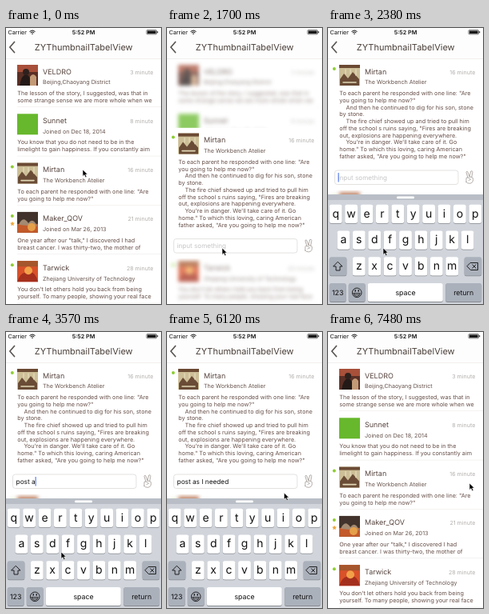
Write an HTML page that moves like this. It is 194 by 345 pixels and loops after 7820 ms.

```html
<!DOCTYPE html>
<html lang="en">
<head>
<meta charset="utf-8">
<title>Thumbnail list</title>
<style>
  html, body { margin: 0; width: 100%; height: 100%; overflow: hidden; background: #fff; }
  svg { display: block; }
  text { font-family: Inter, Roboto, "Liberation Sans", sans-serif; text-rendering: geometricPrecision; white-space: pre; }
  .name { font-size: 9px; fill: #56443e; }
  .sub { font-size: 7.17px; fill: #66534c; }
  .body { font-size: 7.22px; fill: #654e47; }
  .time { font-size: 7.1px; fill: #b3afac; text-anchor: end; }
  .status { font-size: 7.2px; fill: #111; }
  .title { font-size: 11px; fill: #4b403a; text-anchor: middle; }
  .field { font-size: 8.25px; }
  .hint { font-size: 8.1px; }
  .key { font-size: 14px; fill: #111; text-anchor: middle; }
  .word { font-size: 8.8px; fill: #111; text-anchor: middle; }
</style>
</head>
<body>
<svg id="stage" width="194" height="345" viewBox="0 0 194 345"></svg>
<script>
const STEP = 170, LOOP = 7820;
const NAV = 39, ROW = 61.3, LINE = 8.75;
const OPEN_TOP = NAV + 2 * ROW, SHIFT = 85.6, BAR = 37;
const MESSAGE = 'post as I needed';

const rect = (x, y, w, h, fill, extra = '') =>
  `<rect x="${x}" y="${y}" width="${w}" height="${h}" fill="${fill}" ${extra}/>`;
const path = (d, extra) => `<path d="${d}" ${extra}/>`;
const label = (cls, x, y, s) => `<text class="${cls}" x="${x}" y="${y}">${s}</text>`;
const line = (color, width) =>
  `fill="none" stroke="${color}" stroke-width="${width}" stroke-linecap="round" stroke-linejoin="round"`;

// Avatars: soft abstract tones in a 26 px square
const avatars = [
  rect(0, 0, 26, 26, '#5a2f25') + rect(0, 0, 26, 9, '#a8503a') +
    path('M3 26Q5 13 11 12Q17 13 18 26Z', 'fill="#231a18"') +
    path('M16 26V15Q20 9 24 15V26Z', 'fill="#c39a76"') +
    '<circle cx="11" cy="9" r="4" fill="#2e211d"/>',
  rect(0, 0, 26, 26, '#67b82c'),
  rect(0, 0, 26, 26, '#cdbf97') + rect(0, 0, 26, 4, '#6b4a33') +
    path('M1 26V18L6 11L11 17L17 9L25 18V26Z', 'fill="#6a4c36"') +
    path('M5 22H21M8 6V11M14 6V11M21 6V13', line('#e0d6b4', 1.6)),
  rect(0, 0, 26, 26, '#41332b') + rect(0, 15, 26, 11, '#c35a2b') +
    path('M2 16Q7 4 14 14Q20 6 25 18Z', 'fill="#a38a72"') +
    '<circle cx="18" cy="19" r="5" fill="#e5a04a"/>',
  rect(0, 0, 26, 26, '#d9512a') + rect(0, 0, 26, 7, '#a5562c') +
    path('M0 26Q5 12 13 15Q22 11 26 26Z', 'fill="#a52f1d"') +
    '<circle cx="14" cy="12" r="5" fill="#f2a148"/>'
];

const people = [
  ['VELDRO', 'Beijing,Chaoyang District', 3,
    'The lesson of the story, I suggested, was that in', 'some strange sense we are more whole when we'],
  ['Sunnet', 'Joined on Dec 18, 2014', 8,
    'You know that you do not need to be in the', 'limelight to gain happiness. If you constantly aim'],
  ['Mirtan', 'The Workbench Atelier', 16,
    'To each parent he responded with one line: "Are', 'you going to help me now?"'],
  ['Maker_QOV', 'Joined on Mar 26, 2013', 21,
    'One year after our "talk," I discovered I had', 'breast cancer. I was thirty-two, the mother of'],
  ['Tarwick', 'Zhejiang University of Technology', 28,
    "You don't let others hold you back from being", 'yourself. To many people, showing your real face']
];
const story = [
  '>And then he continued to dig for his son, stone', 'by stone.',
  '>The fire chief showed up and tried to pull him',
  'off the school s ruins saying, "Fires are breaking',
  'out, explosions are happening everywhere.',
  ">You're in danger. We'll take care of it. Go",
  'home." To which this loving, caring American',
  'father asked, "Are you going to help me now?"'
];

function cell(i, extraLines = []) {
  const [name, sub, age, ...lines] = people[i];
  const text = lines.concat(extraLines).map((s, n) => {
    const indent = s[0] === '>';
    return label('body', indent ? 22.5 : 14.3, 45.2 + n * LINE, indent ? s.slice(1) : s);
  }).join('');
  const dot = i > 1 ? '<circle cx="7.8" cy="12" r="2" fill="#8dce32"/>' : '';
  const star = i === 3
    ? path('M8 18.8l.9 1.8 2 .3-1.5 1.4.4 2-1.8-1-1.8 1 .4-2-1.5-1.4 2-.3z', 'fill="#eda63a"') : '';
  return `<g transform="translate(14 7)">${avatars[i]}</g>` + dot + star +
    label('name', 46, 18.6, name) + label('sub', 46, 31.4, sub) +
    label('time', 184.3, 18.5, age + ' minute') + text;
}

const list = people.map((_, i) =>
  `<g transform="translate(0 ${NAV + i * ROW})">${cell(i)}${rect(14, 59.5, 180, .5, '#e9e7e5')}</g>`).join('');

const hand = path('M173 16V11.5Q173 10 175 10.5L173 4Q173 2.3 174.7 3L177 9.3L178.7 2.6Q180.6 1.4 181 3.4L179.8 10' +
  'Q182 10.5 181.6 13.2Q181.2 17.6 177.2 17.8Q174 17.8 173 16ZM175 10.5L177.5 11.5M177 9.3L179.8 10M176 14L179 12.5',
  line('#a19a95', .8));
const inputBar = rect(0, -1, 194, 32, '#fff') +
  rect(8.5, 1.5, 154.5, 17.5, '#fff', 'rx="3" stroke="#d8d6d4" stroke-width=".7"') +
  '<text id="field" x="12.6" y="13"></text>' +
  rect(13, 4.5, 1, 11.5, '#3b67e8', 'id="caret"') + hand;

const status = label('status', 2.5, 7.6, 'Carrier') +
  path('M29.8 4.2Q33 1.5 36.2 4.2M31 5.7Q33 4 35 5.7', line('#111', 1)) +
  '<circle cx="33" cy="7.2" r=".8" fill="#111"/>' +
  `<text class="status" x="97" y="7.6" text-anchor="middle" font-weight="600">5:52 PM</text>` +
  rect(176, 2.6, 12.5, 5.2, 'none', 'rx="1" stroke="#111" stroke-width=".6"') +
  rect(176.9, 3.5, 10.7, 3.4, '#111') + rect(189.2, 4.2, 1, 2, '#111');
const nav = rect(0, 0, 194, NAV, '#fdfdfd') + rect(0, NAV - .5, 194, .5, '#e4e2e0') + status +
  path('M10.5 17.5L4.8 24L10.5 30.5', line('#5a5552', 1.7)) +
  label('title', 97.2, 28, 'ZYThumbnailTabelView');

function keyboard() {
  const top = r => 12.8 + r * 32.7;
  const key = (x, r, w, fill) =>
    rect(x, top(r) + .7, w, 23.3, '#868a90', 'rx="2.5"') + rect(x, top(r), w, 23.2, fill, 'rx="2.5"');
  const white = '#fff', gray = '#abb1bb';
  const starts = [1.8, 11.5, 30.9];
  let out = rect(0, 0, 194, 138, '#d1d5db') + rect(0, 0, 194, 7, '#b9bec6') +
    rect(86, 2.6, 22, 2.6, '#fff', 'rx="1.3"');
  ['qwertyuiop', 'asdfghjkl', 'zxcvbnm'].forEach((keys, r) => [...keys].forEach((c, i) => {
    const x = starts[r] + i * 19.4;
    out += key(x, r, 15.8, white) + label('key', x + 7.9, top(r) + 15.8, c);
  }));
  out += key(1.8, 2, 21.5, gray) + key(170.7, 2, 21.5, gray) +
    path('M12.5 84.5L18 90H15V95H10V90H7Z', line('#111', .9)) +
    path('M178.5 85.5H187.5V94.5H178.5L174.2 90ZM180.8 87.8L185 92.2M185 87.8L180.8 92.2', line('#111', .9));
  out += key(1.8, 3, 20.8, gray) + key(25.8, 3, 20.8, gray) + key(49.8, 3, 94, white) + key(147.2, 3, 45, gray);
  out += label('word', 12.2, 126, '123') + label('word', 97, 126, 'space') + label('word', 169.7, 126, 'return') +
    '<circle cx="36.2" cy="122.8" r="5.8" fill="none" stroke="#111" stroke-width=".9"/>' +
    path('M34.2 119.6V121.2M38.2 119.6V121.2', line('#111', 1.3)) +
    path('M32.2 123.5H40.2Q39.4 127.4 36.2 127.4Q33 127.4 32.2 123.5ZM33 125.2H39.4', line('#111', .7));
  return out;
}

const stage = document.getElementById('stage');
stage.innerHTML = `<defs><clipPath id="fold">${rect(0, 0, 194, 60, '#000', 'id="foldBox"')}</clipPath></defs>
  ${rect(0, 0, 194, 345, '#fff')}
  <g id="view"><g id="list">${list}</g>
    <g id="open"><g clip-path="url(#fold)">${rect(0, 0, 194, 170, '#fff')}${cell(2, story)}
      <g id="input" transform="translate(0 137.5)">${inputBar}</g></g></g></g>
  ${nav}
  <g id="keys">${keyboard()}</g>
  <g id="cursor">${path('M0 0V8.4L2 6.6L3.5 9.8L5 9.1L3.6 6H6.2Z', 'fill="#000" stroke="#fff" stroke-width=".6"')}</g>`;

const el = id => document.getElementById(id);
const [view, rows, open, foldBox, input, field, caret, keys, cursor] =
  ['view', 'list', 'open', 'foldBox', 'input', 'field', 'caret', 'keys', 'cursor'].map(el);
const move = (node, x, y) => node.setAttribute('transform', `translate(${x} ${y})`);

// Eased value between [time, value] points
function track(points, t) {
  const i = points.findIndex(p => p[0] > t);
  if (i === 0) return points[0][1];
  if (i < 0) return points[points.length - 1][1];
  const [t0, a] = points[i - 1], [t1, b] = points[i];
  const k = (t - t0) / (t1 - t0);
  return a + (b - a) * k * k * (3 - 2 * k);
}

const unfold = [[170, 0], [680, 1], [6970, 1], [7480, 0]];
const barIn = [[1020, 0], [1360, 1], [6970, 1], [7310, 0]];
const lift = [[1870, 0], [2380, 1], [6630, 1], [7140, 0]];
const cursorX = [[340, 96], [850, 90], [1530, 69], [5610, 69], [6120, 146.5], [6460, 176], [7480, 177]];
const cursorY = [[340, 177], [850, 232], [1530, 275], [5610, 275], [6120, 201], [6460, 187], [7480, 189]];

function draw(t) {
  const u = track(unfold, t), bar = track(barIn, t), up = track(lift, t);

  rows.style.filter = u > 0 ? `blur(${2.7 * u}px)` : 'none';
  rows.style.opacity = 1 - .26 * u;
  open.style.display = u > 0 ? '' : 'none';
  move(open, 0, OPEN_TOP - BAR * bar);
  foldBox.setAttribute('height', 58 + 68.5 * u + BAR * bar);
  input.style.opacity = bar;
  move(view, 0, -SHIFT * up);
  move(keys, 0, 345 - 137 * up);

  const typed = t < 6630 ? Math.max(0, Math.min(MESSAGE.length, Math.floor((t - 2550) / STEP))) : 0;
  field.textContent = typed ? MESSAGE.slice(0, typed) : 'input something';
  field.setAttribute('class', typed ? 'field' : 'hint');
  field.setAttribute('fill', typed ? '#111' : '#c6c5c8');
  const blinkOn = t < 5440 || Math.floor((t - 5440) / 510) % 2 === 0;
  caret.style.display = t >= 2040 && t < 6630 && blinkOn ? '' : 'none';
  // Trailing spaces count towards the caret position
  caret.setAttribute('x', 12.6 + (typed ? field.getComputedTextLength() : 0));

  move(cursor, track(cursorX, t), track(cursorY, t));
}

const start = performance.now();
function tick() {
  const t = (performance.now() - start) % LOOP;
  draw(Math.min(Math.floor(t / STEP) * STEP, LOOP - 2 * STEP));
  requestAnimationFrame(tick);
}
draw(0);
requestAnimationFrame(tick);
</script>
</body>
</html>
```
